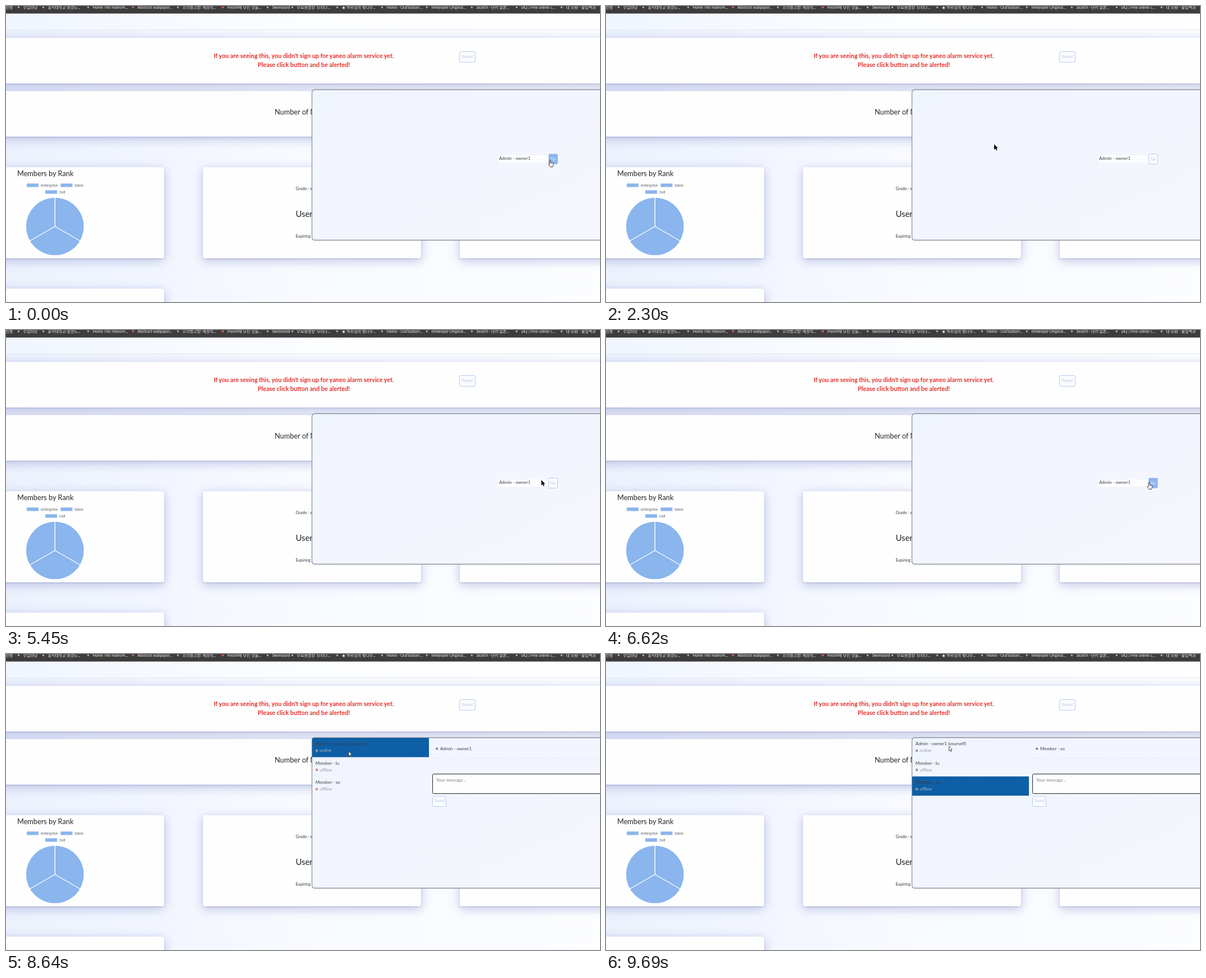
Write an HTML page that moves like this. It is 1059 px wide and 529 px high and loops after 9.77 s.

```html
<!DOCTYPE html>
<html lang="en">
<head>
<meta charset="utf-8">
<title>Member dashboard</title>
<style>
  html, body { margin: 0; width: 100%; height: 100%; overflow: hidden; background: #fafcff; }
  svg { display: block; width: 1059px; height: 529px; font-family: Lato, "Noto Sans CJK KR", "Noto Sans CJK", sans-serif; }
  .card { fill: #fefeff; filter: drop-shadow(0 1px 1px rgba(95, 100, 150, .32)) drop-shadow(0 4px 9px rgba(105, 114, 190, .4)); }
  .bar { font-size: 7px; fill: #eee; }
  .alert { font-size: 10.8px; font-weight: 700; fill: #e5302a; text-anchor: middle; }
  .head { font-size: 12.75px; fill: #212529; }
  .note { font-size: 7.5px; fill: #33373c; }
  .key { font: 6.8px "Liberation Sans", Arial, sans-serif; fill: #666; }
  .item { font-size: 7.9px; fill: #3a3f46; }
  .state { font-size: 7.9px; fill: #999ca6; }
  .btn { fill: #fbfcff; stroke: #b3c9ec; }
  .label { font-size: 7.4px; fill: #b5c6e6; text-anchor: middle; }
</style>
</head>
<body>
<svg viewBox="0 0 1059 529">
  <defs>
    <linearGradient id="sky">
      <stop offset="0" stop-color="#ecf1fd"/>
      <stop offset=".5" stop-color="#f8faff"/>
      <stop offset="1" stop-color="#fcfdff"/>
    </linearGradient>
    <linearGradient id="nav">
      <stop offset="0" stop-color="#f0f5fe"/>
      <stop offset=".5" stop-color="#fcfdff"/>
      <stop offset="1" stop-color="#fefeff"/>
    </linearGradient>
    <linearGradient id="sheet" x2="1" y2="1">
      <stop offset="0" stop-color="#f1f5fe"/>
      <stop offset="1" stop-color="#f5f6fe"/>
    </linearGradient>
  </defs>

  <rect width="1059" height="529" fill="url(#sky)"/>
  <g id="cards"></g>
  <rect y="13" width="1059" height="29" fill="url(#nav)"/>
  <path d="M0 42.5H1059" stroke="#e6e8f1"/>
  <rect width="1059" height="13" fill="#3d3d3e"/>
  <path d="M0 13.5H1059" stroke="#9b9ca2"/>
  <g id="bookmarks"></g>

  <text class="alert" x="531" y="92.7">If you are seeing this, you didn't sign up for yaneo alarm service yet.</text>
  <text class="alert" x="531" y="108.7">Please click button and be alerted!</text>
  <rect class="btn" x="808.5" y="81.5" width="28" height="19" rx="2"/>
  <text class="label" x="822.3" y="93.4">Yaneo!</text>

  <text class="head" x="479" y="194">Number of Members</text>
  <text class="head" x="20" y="303.6">Members by Rank</text>
  <text class="note" x="516.5" y="329.3">Grade : enterprise</text>
  <text class="head" x="516.5" y="377" style="font-size:14.8px">User</text>
  <text class="note" x="516.5" y="413.8">Expiring Date</text>

  <g id="pie" fill="#8ab5ed"><circle cx="87.3" cy="394" r="51.3"/></g>

  <rect x="545.5" y="149.5" width="530" height="269" rx="5" fill="url(#sheet)" stroke="#8d919c" stroke-width="1.3"/>

  <g id="form">
    <rect x="877" y="267" width="90" height="12.5" fill="#fdfdff"/>
    <text class="item" x="879" y="275.4">Admin - owner1</text>
    <rect id="go" class="btn" x="967.5" y="264.5" width="16" height="18" rx="2"/>
    <text id="goLabel" class="label" x="975.5" y="275.7">Go</text>
  </g>

  <g id="list"></g>

  <g id="chat">
    <circle cx="768.2" cy="169.2" r="2.3" fill="#8f949e"/>
    <text id="title" class="item" x="774" y="171.6"></text>
    <path d="M760 186.5H1059" stroke="#e4eaf5"/>
    <rect x="760.5" y="214.5" width="320" height="35" rx="2" fill="#fefeff" stroke="#22252b"/>
    <text class="item" x="767" y="228.3" style="fill:#777d86">Your message...</text>
    <rect class="btn" x="760.5" y="254.5" width="24" height="18" rx="2"/>
    <text class="label" x="772.5" y="265.3" style="font-size:7.9px">Send</text>
  </g>

  <g id="pointer">
    <path id="arrow" d="M0 0V10L2.3 7.9 3.9 11.5 5.5 10.8 3.9 7.3H7Z"/>
    <path id="hand" d="M-.8 1.2a1 1 0 0 1 2 0V5l3.5.8q1.3.4 1.1 1.7l-.5 3.2-.7 1.8H.4L-2.4 8.6q-.6-1 .5-1.3l1.1.6Z" fill="#fff" stroke="#222" stroke-width=".9"/>
  </g>
</svg>
<script>
const LOOP = 9770;
const $ = id => document.getElementById(id);
const show = (el, on) => el.setAttribute('visibility', on ? 'visible' : 'hidden');

function add(parent, tag, attrs, text) {
  const el = document.createElementNS('http://www.w3.org/2000/svg', tag);
  for (const k in attrs) el.setAttribute(k, attrs[k]);
  if (text) el.textContent = text;
  return parent.appendChild(el);
}

// Page cards: two full-width bands, then a grid of three columns
const card = (x, y, width, height, rx) => add($('cards'), 'rect', { class: 'card', x, y, width, height, rx });
for (let i = 0; i < 2; i++) card(-20, 57 + 95 * i, 1100, 81.5, 0);
for (let i = 0; i < 4; i++) card(-107 + 458 * (i % 3), 288 + 217 * Math.floor(i / 3), 389, 163, 4);

// Bookmarks: shortened names take a wide slot, short ones a narrow slot
const bookmarks = ['수강신청', '수업마당', '홍익대학교 중앙도...', 'Home  The Halvorn...',
  'Abstract wallpaper...', '소리창고방: 세상의...', 'Pixorn에 모신 것을...', 'Skemolard',
  "무료동영상 '모리나...", '★ 하루님의 벚나무...', 'Home - OurStatueT...', 'Innkeeper Original...',
  'Search ‹ 단어 일본...', 'ulQ | Free online c...', '네 모람 - 솔잎백과'];
let slot = -13.5;
for (const name of bookmarks) {
  const fill = /^(Abs|Pix)/.test(name) ? '#e0705f' : '#a9acb2';
  add($('bookmarks'), 'circle', { cx: slot - 8, cy: 2.5, r: 1.7, fill });
  add($('bookmarks'), 'text', { class: 'bar', x: slot, y: 5 }, name);
  slot += name.endsWith('...') ? 80 : 44;
}

// Pie with three equal parts and its legend
for (let i = 0; i < 3; i++) {
  add($('pie'), 'path', { d: 'M87.3 394v-52', stroke: '#fff', 'stroke-width': 1.4, transform: `rotate(${i * 120} 87.3 394)` });
}
[['enterprise', 37, 317], ['basic', 97.5, 317], ['null', 70, 329]].forEach(([name, x, y]) => {
  add($('pie'), 'rect', { x, y: y + .3, width: 21, height: 6.2 });
  add($('pie'), 'text', { class: 'key', x: x + 25, y: y + 5.5 }, name);
});

const people = ['Admin - owner1', 'Member - lu', 'Member - so'];
const rows = people.map((name, i) => {
  const g = add($('list'), 'g', { transform: `translate(0 ${i * 34.4})` });
  const back = add(g, 'rect', { x: 546, y: 150, width: 208, height: 34.4, fill: '#0e5fa5' });
  add(g, 'text', { class: 'item', x: 551.7, y: 163.2 }, i ? name : name + ' (yourself)');
  const dot = add(g, 'circle', { cx: 554, cy: 172.7, r: 2.3 });
  const state = add(g, 'text', { class: 'state', x: 559.3, y: 175.2 }, i ? 'offline' : 'online');
  return { back, dot, state };
});

// Pointer moves: start and end time, place reached
const moves = [
  [30, 990, 738, 241], [1040, 1500, 705, 241], [1640, 1830, 692, 247],
  [4680, 5650, 966, 269], [6070, 6620, 968, 272], [7400, 7950, 676, 236.5],
  [7950, 8360, 611, 174], [9060, 9280, 596, 208.5], [9280, 9380, 600, 240],
  [9600, 9690, 611.5, 165]
];
const easeOut = k => 1 - (1 - k) ** 2;

function tipAt(t) {
  let x = 970, y = 275;
  for (const [from, to, toX, toY] of moves) {
    if (t < from) break;
    const k = easeOut(Math.min(1, (t - from) / (to - from)));
    x += (toX - x) * k;
    y += (toY - y) * k;
  }
  return [x, y];
}

const JOIN = 7100;
const picks = [8640, 9310, 9600];

function draw(t) {
  const joined = t >= JOIN;
  const hover = t < 60 || (t >= 6200 && !joined);
  const picked = picks.filter(time => t >= time).length - 1;

  show($('form'), !joined);
  $('go').style.fill = hover ? '#8ab5ed' : '';
  $('goLabel').style.fill = hover ? '#f4f8ff' : '';

  show($('list'), joined);
  rows.forEach(({ back, dot, state }, i) => {
    show(back, joined && i === picked);
    dot.setAttribute('fill', i && picked < 2 ? '#d98a82' : '#999ba2');
    state.style.fill = i === picked ? '#a9b6c8' : '';
  });

  show($('chat'), picked >= 0);
  $('title').textContent = people[picked] || '';

  $('pointer').setAttribute('transform', `translate(${tipAt(t)})`);
  show($('hand'), hover);
  const arrow = $('arrow');
  show(arrow, !hover);
  arrow.setAttribute('fill', joined ? '#fff' : '#050505');
  arrow.setAttribute('stroke', joined ? '#333' : 'none');
  arrow.setAttribute('transform', `scale(${joined ? .82 : .98})`);
}

const start = performance.now();
function tick() {
  draw((performance.now() - start) % LOOP);
  requestAnimationFrame(tick);
}
tick();
</script>
</body>
</html>
```
